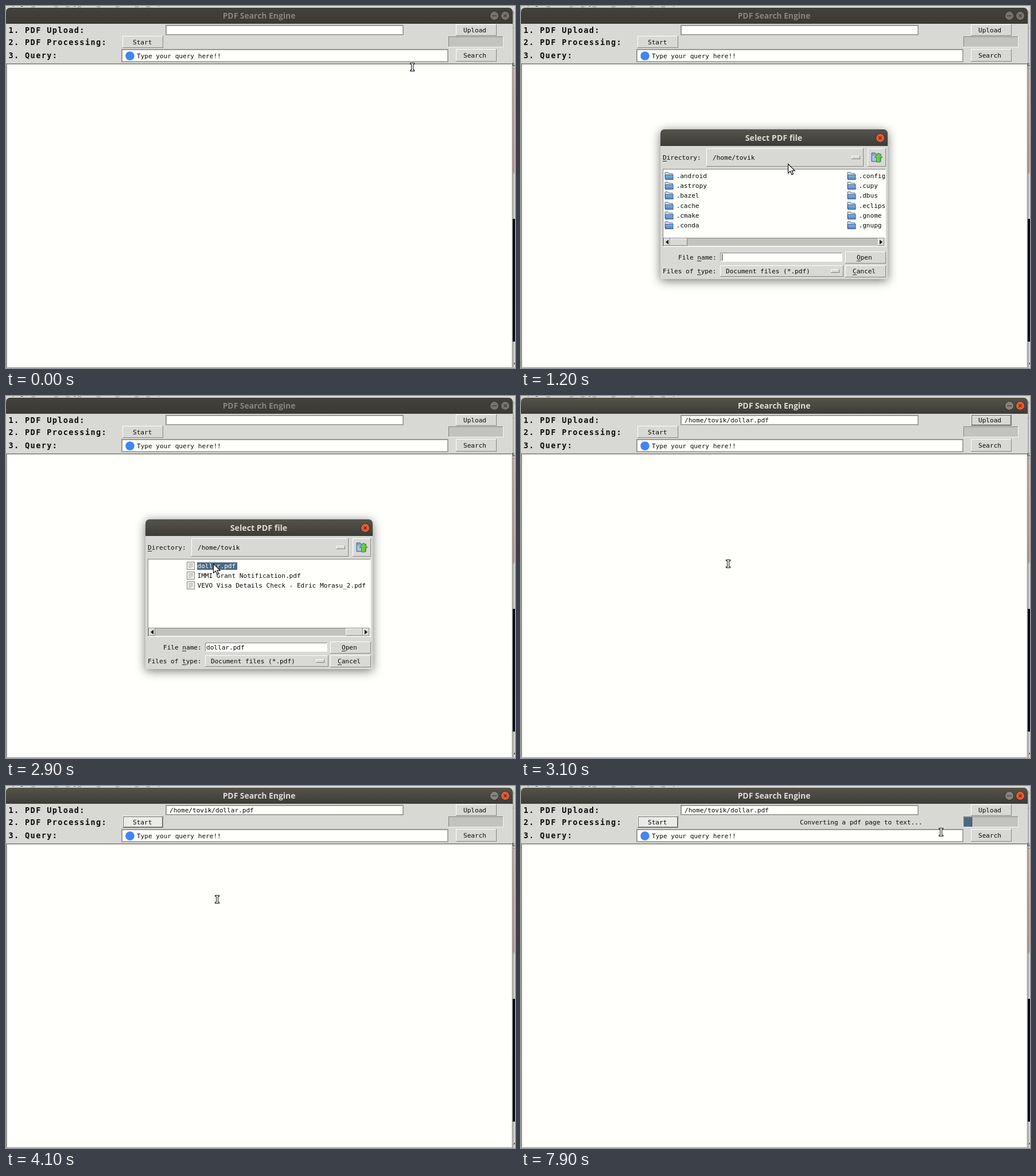
Write an HTML page with a canvas that moves like this. It is 887 by 631 pixels and loops after 8000 ms.

```html
<!DOCTYPE html>
<html lang="en">
<head>
<meta charset="utf-8">
<title>PDF Search Engine</title>
<style>
html, body { margin: 0; width: 100%; height: 100%; overflow: hidden; background: #d8d8d5; }
canvas { display: block; width: 887px; height: 631px; }
</style>
</head>
<body>
<canvas id="stage" width="887" height="631"></canvas>
<script>
const ctx = document.getElementById('stage').getContext('2d');
const LOOP = 8000, STEP = 100;
const FACE = '#d8d8d5', PAPER = '#fffffb', DARK = '#838381', TROUGH = '#c2c2bf', BLUE = '#4a6984';
const MONO = '"DejaVu Sans Mono", "Liberation Mono", monospace';
const SMALL = '11.08px ' + MONO, CHAR = 6.67;
const HOME = '/home/tovik';

// Moments of the story, in ms
const T = { press: 900, open: 1100, pick: 2900, close: 3100, start: 3800, convert: 6400 };

// Pointer path: time, x, y
const PATH = [
  [0, 708, 106], [300, 735, 92], [800, 807, 43], [1000, 805, 46], [1100, 640, 165], [1200, 465, 275],
  [1700, 275, 409], [1800, 275, 411], [1900, 430, 415], [2000, 640, 420], [2100, 820, 424],
  [2200, 480, 424], [2300, 480, 424], [2400, 455, 400], [2500, 400, 340], [2600, 352, 300],
  [2700, 361, 292], [3100, 361, 292], [3200, 364, 295], [3700, 245, 62], [3900, 245, 62],
  [4000, 300, 120], [4100, 368, 197], [7300, 368, 197], [7400, 430, 175], [7500, 560, 125],
  [7600, 690, 88], [7700, 732, 80], [8000, 732, 80]
];

const FOLDERS = ('.android .astropy .bazel .cache .cmake .conda .config .cupy .dbus .eclipse .gnome .gnupg ' +
  '.ipython .java .jupyter .keras .local .nano .npm .nv .pki .ssh .vim .wget ' +
  'Desktop Documents Downloads Music Pictures Public Templates Videos bin data models notes').split(' ');
const FILES = ['dollar.pdf', 'IMMI Grant Notification.pdf', 'VEVO Visa Details Check - Edric Morasu_2.pdf'];
const COLUMNS = 14, COL_W = 318, SCROLL_MAX = COLUMNS * COL_W - 65;

function rect(x, y, w, h, color) {
  ctx.fillStyle = color;
  ctx.fillRect(x, y, w, h);
}

function text(str, x, y, color = '#0a0a0a', font = SMALL) {
  ctx.font = font;
  ctx.fillStyle = color;
  ctx.fillText(str, x, y);
}

function underlined(str, x, y, i) {
  text(str, x, y);
  rect(Math.round(x + i * CHAR), y + 2, 7, 1, '#222');
}

function disc(x, y, r, color) {
  ctx.fillStyle = color;
  ctx.beginPath();
  ctx.arc(x, y, r, 0, Math.PI * 2);
  ctx.fill();
}

function poly(points, fill, stroke, width = 1) {
  ctx.beginPath();
  points.forEach(([x, y]) => ctx.lineTo(x, y));
  ctx.closePath();
  if (fill) { ctx.fillStyle = fill; ctx.fill(); }
  if (stroke) { ctx.strokeStyle = stroke; ctx.lineWidth = width; ctx.stroke(); }
}

function vertical(y0, y1, a, b) {
  const g = ctx.createLinearGradient(0, y0, 0, y1);
  g.addColorStop(0, a);
  g.addColorStop(1, b);
  return g;
}

function raised(x, y, w, h, fill = FACE) {
  rect(x, y, w, h, DARK);
  rect(x, y, w - 1, h - 1, '#fff');
  rect(x + 1, y + 1, w - 2, h - 2, fill);
}

function sunken(x, y, w, h, fill = PAPER) {
  rect(x, y, w, h, '#f4f4f1');
  rect(x, y, w - 1, h - 1, DARK);
  rect(x + 1, y + 1, w - 2, h - 2, fill);
}

function entry(x, y, w, h) {
  rect(x, y, w, h, '#a3a3a0');
  rect(x, y, w - 1, h - 1, '#8c8c89');
  rect(x + 1, y + 1, w - 2, h - 2, '#a3a3a0');
  rect(x + 2, y + 2, w - 4, h - 4, PAPER);
}

function button(label, x, y, w, h, tx, ty, { focus, hot, pressed } = {}) {
  (pressed ? sunken : raised)(x, y, w, h, hot ? '#ebebe8' : FACE);
  if (focus) {
    ctx.strokeStyle = '#111';
    ctx.lineWidth = 1;
    ctx.setLineDash([1, 0.6]);
    ctx.strokeRect(x + 1.5, y + 1.5, w - 3, h - 3);
    ctx.setLineDash([]);
  }
  const shift = pressed ? 1 : 0;
  text(label, tx + shift, ty + shift);
}

function titleBar(x, y, w, h, title, size, active) {
  ctx.fillStyle = active ? vertical(y, y + h, '#55544b', '#3c3b36') : vertical(y, y + h, '#42413b', '#3b3a35');
  ctx.beginPath();
  ctx.roundRect(x, y, w, h, [7, 7, 0, 0]);
  ctx.fill();
  ctx.textAlign = 'center';
  text(title, x + w / 2 - 0.5, y + h / 2 + 5, active ? '#dfdbd2' : '#86847c',
    `bold ${size}px "Open Sans", "Noto Sans", sans-serif`);
  ctx.textAlign = 'left';
}

function closeDot(x, y, active) {
  disc(x, y, 8, '#32312d');
  disc(x, y, 7.2, active ? '#e35c33' : '#76746d');
  ctx.strokeStyle = active ? '#5c2a17' : '#3f3e39';
  ctx.lineWidth = 1.3;
  ctx.beginPath();
  for (const s of [-1, 1]) {
    ctx.moveTo(x - 2.5, y - 2.5 * s);
    ctx.lineTo(x + 2.5, y + 2.5 * s);
  }
  ctx.stroke();
}

function backdrop() {
  rect(0, 0, 887, 631, '#d7d7d4');
  text('pages_found_in_by_word_from_text_to_map', 11, -1, '#222');
  rect(883, 12, 4, 1, '#aaa');
  rect(883, 38, 4, 1, '#b5b5b3');
  text('u', 882, 105, '#222');
  rect(883, 108, 4, 1, '#999');
  rect(883, 109, 4, 181, vertical(109, 290, '#d8bfb9', '#c6a9a5'));
  rect(883, 291, 4, 1, '#aaa');
  rect(883, 371, 4, 214, vertical(371, 585, '#020510', '#050a22'));
  text(',', 883, 624, '#222');
  rect(883, 8, 2, 623, 'rgba(0,0,0,.2)');
}

function mainWindow(t) {
  const active = t >= T.close;
  titleBar(0, 3, 883, 28, 'PDF Search Engine', 13.9, active);
  disc(851, 17, 8, '#32312d');
  disc(851, 17, 7.2, active ? '#86847b' : '#76746d');
  rect(847, 16.5, 8, 1.3, '#3f3e39');
  closeDot(870, 17, active);
  rect(0, 31, 883, 600, FACE);

  ctx.letterSpacing = '1.4px';
  ['1. PDF Upload:', '2. PDF Processing:', '3. Query:'].forEach((s, i) =>
    text(s, 4.5, [47, 68, 91][i], '#0a0a0a', 'bold 13.5px ' + MONO));
  ctx.letterSpacing = '0px';

  entry(278, 33, 415, 18);
  if (active) text(HOME + '/dollar.pdf', 285, 46);
  const pressed = t >= T.press && t < T.open;
  const hot = t >= 700 && t < T.open;
  button('Upload', 784, 32, 71, 20, 797, 46, { focus: pressed || (active && t < T.start), hot, pressed });

  const started = t >= T.start;
  button('Start', 203, 52, 71, 21, 221, 67, { focus: started, hot: started });
  sunken(771, 53, 96, 19, TROUGH);
  if (t >= T.convert) {
    text('Converting a pdf page to text...', 486, 67);
    const k = Math.floor((t - 6450) / 150);
    const right = k > 0 ? 774.75 + 1.27 * k : 773;
    rect(772, 54, right - 772, 17, BLUE);
    if (k > 1) {
      rect(773, 54, right - 773, 1, '#6d8aa3');
      rect(right - 1, 54, 1, 17, '#344b5f');
    }
  }

  entry(201, 75, 570, 23);
  disc(216, 87, 7.8, '#4285f4');
  text('Type your query here!!', 228, 91);
  button('Search', 784, 75, 71, 22, 797, 90);

  rect(0, 100, 883, 531, DARK);
  rect(1, 101, 882, 530, '#a9a9a6');
  rect(2, 102, 879, 527, PAPER);
  rect(881, 101, 1, 529, FACE);
  rect(1, 629, 881, 1, FACE);
}

function folder(x, y) {
  poly([[x + 1, y + 1], [x + 6, y + 1], [x + 8, y + 3], [x + 14, y + 3], [x + 14, y + 12], [x + 1, y + 12]], '#d5dde6', '#566b80');
  ctx.fillStyle = vertical(y + 5, y + 14, '#8db4e2', '#4e80bd');
  ctx.fillRect(x + 1.5, y + 5.5, 13.5, 8);
  ctx.strokeStyle = '#355f93';
  ctx.lineWidth = 1;
  ctx.strokeRect(x + 1.5, y + 5.5, 13.5, 8);
}

function page(x, y) {
  rect(x, y, 14, 14, '#82827f');
  rect(x + 1, y + 1, 12, 12, '#f2f2ef');
  for (let i = 0; i < 4; i++) rect(x + 3, y + 3 + i * 2.3, i === 3 ? 5 : 8, 1, '#a4a4a1');
}

function fileList(scroll, picked) {
  ctx.save();
  ctx.beginPath();
  ctx.rect(249, 286, 385, 117);
  ctx.clip();
  for (let c = 0; c <= COLUMNS; c++) {
    const x = 250 + c * COL_W - scroll;
    if (x > 640 || x < -80) continue;
    for (let r = 0; r < 6; r++) {
      const mid = 296 + r * 17.2, base = Math.round(mid + 4);
      if (c < COLUMNS) {
        folder(x, Math.round(mid - 7));
        text(FOLDERS[(c * 6 + r) % FOLDERS.length], x + 20.5, base);
      } else if (r < FILES.length) {
        const hit = picked && r === 0;
        page(x, Math.round(mid - 7));
        if (hit) rect(x + 18, 290, 70, 13, BLUE);
        text(FILES[r], x + 18.5, base, hit ? '#fff' : undefined);
      }
    }
  }
  ctx.restore();
}

function upIcon() {
  poly([[611, 256], [617, 256], [619, 258], [627, 258], [627, 271], [611, 271]], '#7fa6d6', '#3c6290');
  rect(612, 261, 12, 9, '#a9c4e6');
  poly([[623, 256], [630, 264], [626, 264], [626, 272], [619.5, 272], [619.5, 264], [616, 264]], '#6fce3c', '#3a8a1c');
}

function dialog(t, scroll) {
  ctx.save();
  ctx.shadowColor = 'rgba(0,0,0,.55)';
  ctx.shadowBlur = 17;
  ctx.shadowOffsetY = 3;
  ctx.fillStyle = FACE;
  ctx.beginPath();
  ctx.roundRect(243, 215, 396, 261, [7, 7, 0, 0]);
  ctx.fill();
  ctx.restore();
  titleBar(243, 215, 396, 29, 'Select PDF file', 14.2, true);
  closeDot(626, 230, true);

  underlined('Directory:', 247, 268, 0);
  raised(323, 248, 274, 32);
  text(HOME, 334, 268);
  raised(576, 261, 15, 6);
  raised(604, 248, 32, 32);
  upIcon();

  sunken(247, 284, 389, 136, FACE);
  rect(248, 285, 387, 119, PAPER);
  const picked = t >= T.pick;
  fileList(scroll * SCROLL_MAX, picked);

  sunken(248, 404, 386, 15, TROUGH);
  raised(249, 405, 11, 13);
  raised(622, 405, 11, 13);
  poly([[252, 411.5], [257, 407.5], [257, 415.5]], '#111');
  poly([[630, 411.5], [625, 407.5], [625, 415.5]], '#111');
  raised(260 + 332 * scroll, 405, 30, 13);

  underlined('File name:', 274, 442, 5);
  sunken(347, 430, 213, 16);
  if (picked) text(FILES[0], 349, 442);
  else if (t % 900 < 600) rect(350, 432, 1, 12, '#111');
  raised(565, 428, 71, 21);
  underlined('Open', 585, 442, 0);

  underlined('Files of type:', 247, 466, 9);
  raised(347, 452, 215, 20);
  text('Document files (*.pdf)', 357, 466);
  raised(540, 459, 15, 6);
  raised(565, 452, 71, 21);
  underlined('Cancel', 578, 466, 0);
}

function pointerAt(t) {
  const i = Math.max(1, PATH.findIndex(p => p[0] >= t));
  const [t0, x0, y0] = PATH[i - 1], [t1, x1, y1] = PATH[i];
  const k = (t - t0) / (t1 - t0);
  return [x0 + (x1 - x0) * k, y0 + (y1 - y0) * k];
}

// Hollow text cursor: a black shape with a white core
function beam(x, y) {
  for (const [color, g] of [['#111', 0], ['#fff', 1]]) {
    rect(x - 4 + g, y - 7 + g, 8 - 2 * g, 3 - 2 * g, color);
    rect(x - 4 + g, y + 5 + g, 8 - 2 * g, 3 - 2 * g, color);
    rect(x - 2 + g, y - 5 - g, 4 - 2 * g, 11 + 2 * g, color);
  }
}

function pointer(x, y, modal) {
  const inside = (l, top, r, b) => x > l && x < r && y > top && y < b;
  const overText = inside(2, 101, 882, 630) || inside(201, 75, 771, 98) || inside(278, 33, 693, 51);
  if (overText && !modal) return beam(Math.round(x), Math.round(y));
  const shape = [[0, 0], [0, 16], [3.8, 12.5], [6.4, 18.5], [9, 17.4], [6.5, 11.6], [11.6, 11.6]];
  poly(shape.map(([a, b]) => [x + a + 0.5, y + b + 0.5]), '#fff', '#111', 1.2);
}

function draw(t) {
  const [x, y] = pointerAt(t);
  const modal = t >= T.open && t < T.close;
  backdrop();
  mainWindow(t);
  if (modal) {
    // The thumb follows the dragged pointer until it hits the end
    const scroll = t < 1800 ? 0 : t >= 2000 ? 1 : Math.min(1, Math.max(0, (x - 275) / 332));
    dialog(t, scroll);
  }
  pointer(x, y, modal);
}

const begin = performance.now();
function tick() {
  const t = (performance.now() - begin) % LOOP;
  draw(Math.floor(t / STEP) * STEP);
  requestAnimationFrame(tick);
}
tick();
</script>
</body>
</html>
```
